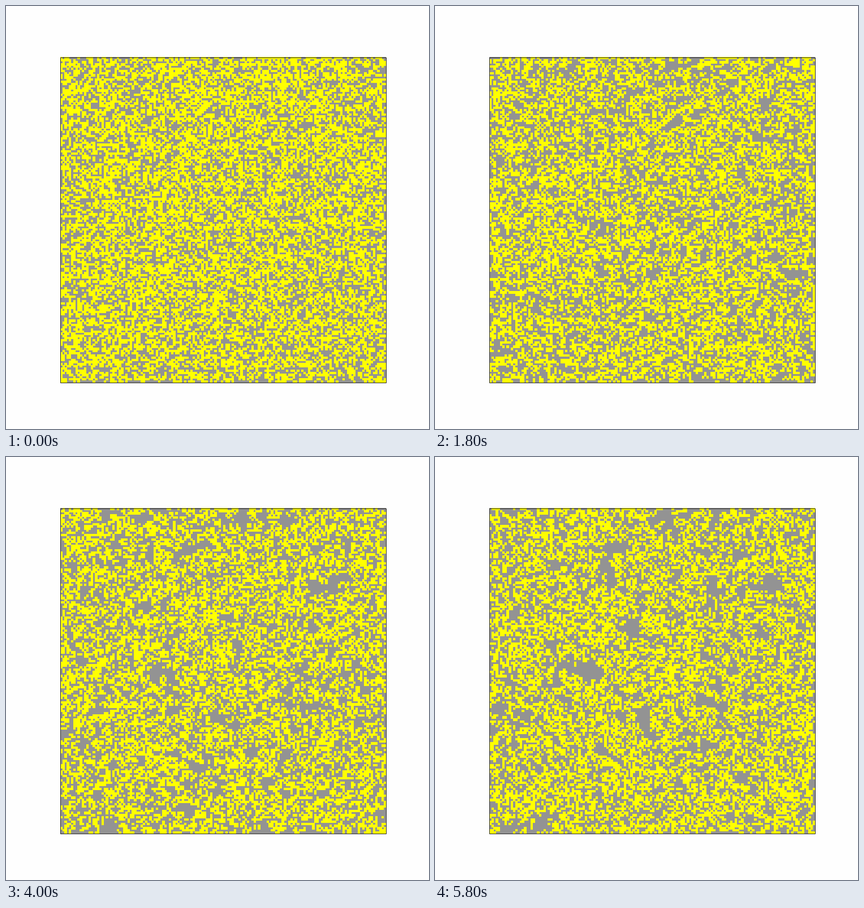
A matplotlib script for the animation above (6000 ms loop, 748 px wide and 748 px high).

```python
import numpy as np
import matplotlib.pyplot as plt
from matplotlib.animation import FuncAnimation
from matplotlib.colors import ListedColormap
from matplotlib.patches import Rectangle

SIZE, DPI = 748, 100
LEFT, TOP, SIDE = 96, 90, 576
CELLS = 150
FRAMES, STEP_MS = 30, 200
BIRTH = [3, 5, 7]
SURVIVE = [1, 3, 5, 8]


def evolve(grid):
    """One step of a life-like automaton on a torus."""
    near = sum(np.roll(grid, (dy, dx), (0, 1))
               for dy in (-1, 0, 1) for dx in (-1, 0, 1) if dy or dx)
    alive = np.where(grid == 1, np.isin(near, SURVIVE), np.isin(near, BIRTH))
    return alive.astype(int)


def rasterize(grid):
    """Scale cells to pixels; live cells spill slightly over their edges."""
    centre = np.arange(SIDE) + 0.5
    lo, hi = (np.clip((centre + pad) * CELLS / SIDE, 0, CELLS - 1).astype(int)
              for pad in (-0.25, 0.25))
    wide = grid[:, lo] | grid[:, hi]
    return wide[lo] | wide[hi]


states = [np.random.default_rng(12).integers(0, 2, (CELLS, CELLS))]
while len(states) < FRAMES - 1:
    states.append(evolve(states[-1]))

fig = plt.figure(figsize=(SIZE / DPI, SIZE / DPI), dpi=DPI, facecolor="#fefefe")
ax = fig.add_axes([0, 0, 1, 1])
image = ax.imshow(rasterize(states[0]), cmap=ListedColormap(["#939393", "#ffff00"]),
                  vmin=0, vmax=1, interpolation="nearest", aspect="auto",
                  extent=(LEFT, LEFT + SIDE, TOP + SIDE, TOP))
ax.add_patch(Rectangle((LEFT + 0.5, TOP + 0.5), SIDE, SIDE - 1, fill=False,
                       edgecolor="#2b2b2b", linewidth=72 / DPI, zorder=3))
ax.set(xlim=(0, SIZE), ylim=(SIZE, 0))
ax.axis("off")


def update(frame):
    # The opening state is held for two steps.
    image.set_data(rasterize(states[max(frame - 1, 0)]))
    return [image]


anim = FuncAnimation(fig, update, frames=FRAMES, interval=STEP_MS,
                     repeat=True, repeat_delay=0, blit=False)
plt.show()
```
